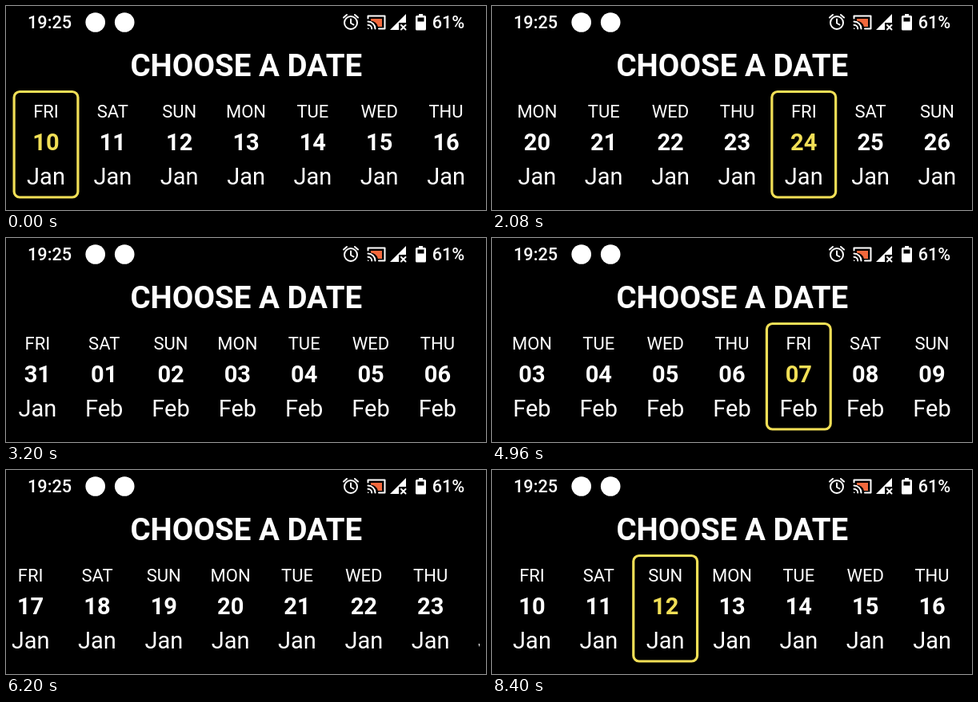
An HTML page for the animation above (8440 ms loop, 600 by 256 pixels).

```html
<!DOCTYPE html>
<html lang="en">
<head>
<meta charset="utf-8">
<title>Choose a date</title>
<style>
  html, body { margin: 0; width: 100%; height: 100%; overflow: hidden; background: #000; }
  svg { display: block; width: 100%; height: 100%; }
  text { font-family: Roboto, sans-serif; fill: #fff; }
  .status { font-size: 21.7px; font-weight: 500; }
  .title { font-size: 38.5px; font-weight: 700; text-anchor: middle; }
  .day { font-size: 22px; text-anchor: middle; }
  .date { font-size: 29px; font-weight: 700; text-anchor: middle; }
  .month { font-size: 29px; text-anchor: middle; }
  .ring { fill: none; stroke: #f1df56; stroke-width: 3.2; }
  .line { fill: none; stroke: #fff; stroke-width: 2; stroke-linecap: round; stroke-linejoin: round; }
</style>
</head>
<body>
<svg viewBox="0 0 600 256">
  <defs><clipPath id="view"><rect x="8" y="100" width="584" height="150"/></clipPath></defs>
  <rect width="600" height="256"/>

  <text class="status" x="27" y="28">19:25</text>
  <circle cx="111.7" cy="20.5" r="12.3" fill="#fff"/>
  <circle cx="148.2" cy="20.5" r="12.3" fill="#fff"/>

  <g class="line">
    <circle cx="431" cy="21" r="8"/>
    <path d="M431 16.5V21.5L434.5 23.5M422 14.5L426 11M440 14.5L436 11"/>
  </g>

  <path d="M456 16H470V26H465Q463 19 456 18.5Z" fill="#f2683c"/>
  <path class="line" d="M452.5 15.5V12.5H473.5V28.5H466M452.5 19.5A9 9 0 0 1 461.5 28.5M452.5 23.8A4.7 4.7 0 0 1 457.2 28.5"/>
  <path d="M452 27L454 29H452Z" fill="#fff"/>

  <path d="M480 30L500 10V21H491V30Z" fill="#fff"/>
  <path class="line" d="M494 24L499.5 29.5M499.5 24L494 29.5"/>

  <path d="M516 10H521V12H523.5Q525 12 525 13.5V29Q525 30.5 523.5 30.5H513.5Q512 30.5 512 29V13.5Q512 12 513.5 12H516Z" fill="#fff"/>
  <rect x="514.5" y="14.5" width="8" height="5"/>
  <text class="status" x="532.7" y="28">61%</text>

  <text class="title" x="300.3" y="88">CHOOSE A DATE</text>
  <g clip-path="url(#view)"><g id="strip"></g></g>
</svg>
<script>
const LOOP = 8440, PITCH = 83.34, FIRST = 50, COUNT = 31, FADE = 120;
const DAYS = ['FRI', 'SAT', 'SUN', 'MON', 'TUE', 'WED', 'THU'];
const WHITE = [255, 255, 255], YELLOW = [241, 223, 86];

// Each swipe: start, end, offset reached
const SWIPES = [
  [250, 1250, 827], [2080, 3200, 1760.8], [3330, 3720, 2000.2],
  [5210, 6490, 493], [6850, 7840, 0]
];
// Each tap: time, tile index
const TAPS = [[-FADE, 0], [1480, 14], [4200, 28], [5040, 25], [6520, 8], [7920, 2]];

const strip = document.getElementById('strip');
const clamp = v => Math.max(0, Math.min(1, v));

function add(parent, tag, attrs, text) {
  const el = document.createElementNS('http://www.w3.org/2000/svg', tag);
  for (const key in attrs) el.setAttribute(key, attrs[key]);
  if (text) el.textContent = text;
  parent.appendChild(el);
  return el;
}

function makeTile(i) {
  const g = add(strip, 'g', { transform: `translate(${FIRST + i * PITCH} 0)` });
  const january = i < 22;
  const label = String(january ? 10 + i : i - 21).padStart(2, '0');
  add(g, 'text', { class: 'day', y: 140 }, DAYS[i % 7]);
  const date = add(g, 'text', { class: 'date', y: 181 }, label);
  add(g, 'text', { class: 'month', y: 224 }, january ? 'Jan' : 'Feb');
  const ring = add(g, 'rect', { class: 'ring', x: -39.9, y: 107.5, width: 79.8, height: 132.5, rx: 7 });
  return { date, ring };
}

const tiles = Array.from({ length: COUNT }, (_, i) => makeTile(i));

// Speed rises until `peak`, then falls evenly to rest
function glide(u, peak = 0.3) {
  return u < peak ? u * u / peak : 1 - (1 - u) ** 2 / (1 - peak);
}

function offsetAt(t) {
  let offset = 0;
  for (const [start, end, to] of SWIPES)
    offset += (to - offset) * glide(clamp((t - start) / (end - start)));
  return offset;
}

function choiceAt(t) {
  const amounts = new Array(COUNT).fill(0);
  const n = TAPS.filter(tap => tap[0] <= t).length - 1;
  const k = clamp((t - TAPS[n][0]) / FADE);
  if (n > 0) amounts[TAPS[n - 1][1]] = 1 - k;
  amounts[TAPS[n][1]] = k;
  return amounts;
}

function draw(t) {
  strip.setAttribute('transform', `translate(${-offsetAt(t)} 0)`);
  choiceAt(t).forEach((k, i) => {
    const { date, ring } = tiles[i];
    ring.style.opacity = k;
    date.style.fill = `rgb(${WHITE.map((c, j) => Math.round(c + (YELLOW[j] - c) * k))})`;
  });
}

const begin = performance.now();
function tick() {
  draw((performance.now() - begin) % LOOP);
  requestAnimationFrame(tick);
}
tick();
</script>
</body>
</html>
```
